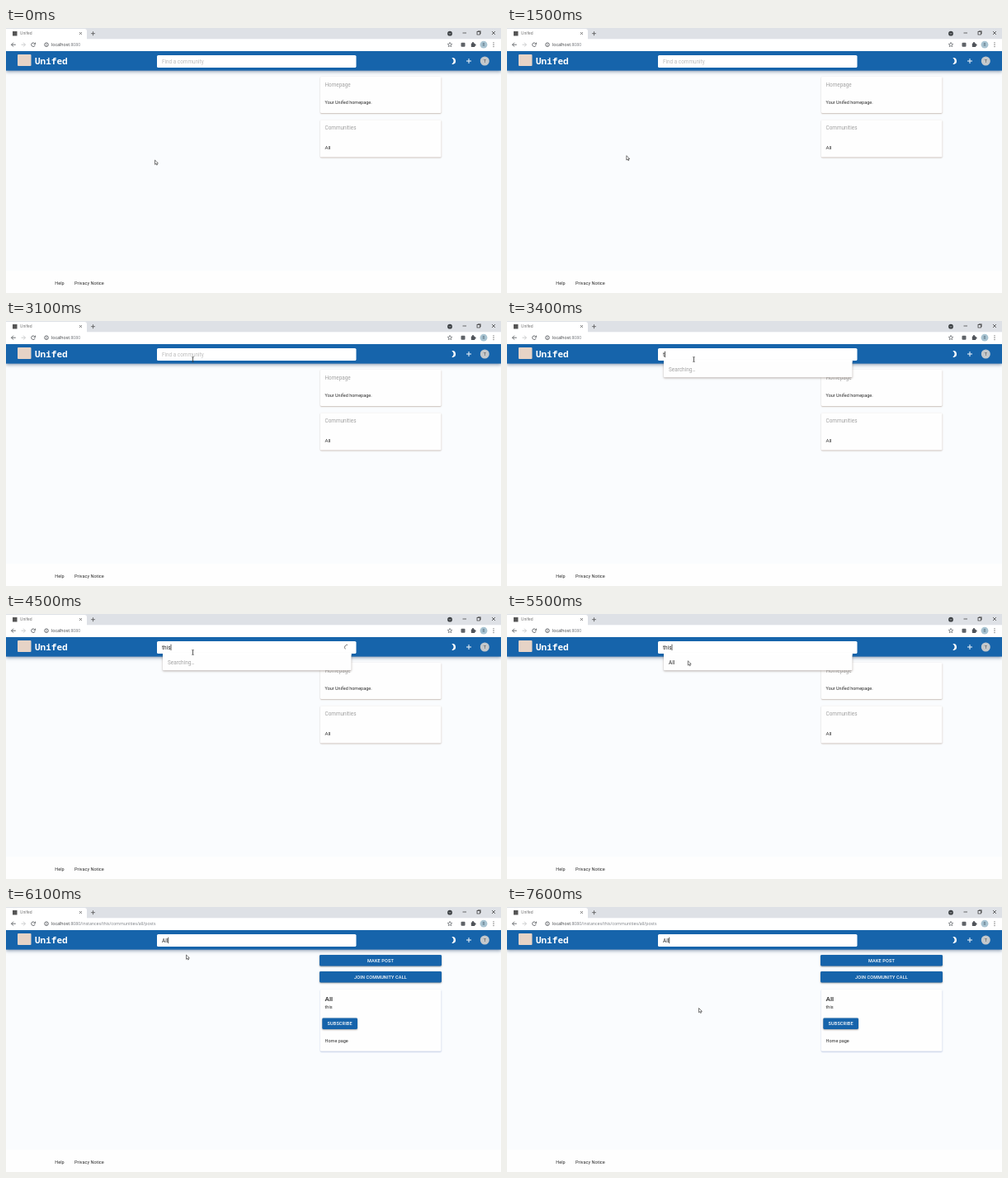
An HTML page with a canvas that plays this animation: 600 by 321 pixels, repeating every 7.7 s.

```html
<!DOCTYPE html>
<html lang="en">
<head>
<meta charset="utf-8">
<title>Community search</title>
<style>
  html, body { margin: 0; width: 100%; height: 100%; overflow: hidden; background: #fafcfe; }
  canvas { display: block; width: 600px; height: 321px; }
</style>
</head>
<body>
<canvas id="stage" width="600" height="321"></canvas>
<script>
const ctx = document.getElementById('stage').getContext('2d');
const LOOP = 7700, STEP = 100, TAU = Math.PI * 2;
const BLUE = '#1664ab', CARD = '#fefefe', INK = '#2c2c2c', GREY = '#a2a2a2';
const ROBOTO = 'Roboto, sans-serif', UI = '"Open Sans", sans-serif', MONO = '"Noto Sans Mono", monospace';

function rect(x, y, w, h, color) {
  ctx.fillStyle = color;
  ctx.fillRect(x, y, w, h);
}

function round(x, y, w, h, r, color) {
  ctx.fillStyle = color;
  ctx.beginPath();
  ctx.roundRect(x, y, w, h, r);
  ctx.fill();
}

function disc(x, y, r, color) {
  ctx.fillStyle = color;
  ctx.beginPath();
  ctx.arc(x, y, r, 0, TAU);
  ctx.fill();
}

function line(points, color, width = 0.8) {
  ctx.strokeStyle = color;
  ctx.lineWidth = width;
  ctx.beginPath();
  points.forEach(([x, y], i) => i ? ctx.lineTo(x, y) : ctx.moveTo(x, y));
  ctx.stroke();
}

function text(str, x, y, size, color = INK, opts = {}) {
  const { font = ROBOTO, weight = 400, align = 'left', spacing = 0 } = opts;
  ctx.font = `${weight} ${size}px ${font}`;
  ctx.letterSpacing = spacing + 'px';
  ctx.textAlign = align;
  ctx.fillStyle = color;
  ctx.fillText(str, x, y);
  const width = ctx.measureText(str).width;
  ctx.letterSpacing = '0px';
  return width;
}

function shadowed(color, blur, dy, draw) {
  ctx.save();
  ctx.shadowColor = color;
  ctx.shadowBlur = blur;
  ctx.shadowOffsetY = dy;
  draw();
  ctx.restore();
}

const clamp = v => Math.max(0, Math.min(1, v));
const ease = v => v * v * (3 - 2 * v);

// Piecewise eased pointer path: [time, x, y]
const PATH = [
  [0, 180.5, 160], [600, 180.5, 160], [700, 140.5, 160], [1400, 140.5, 160],
  [2100, 218.5, 63], [2200, 221, 53], [2500, 226.5, 46.5], [5100, 226.5, 46.5],
  [5600, 218.5, 58], [6200, 218.5, 58], [7000, 232.5, 122.5], [LOOP, 232.5, 122.5]
];

function pointerAt(t) {
  const i = PATH.findIndex(p => p[0] > t);
  const [t0, x0, y0] = PATH[i - 1], [t1, x1, y1] = PATH[i];
  const k = ease(clamp((t - t0) / (t1 - t0)));
  return [x0 + (x1 - x0) * k, y0 + (y1 - y0) * k];
}

function pointer(t) {
  const [x, y] = pointerAt(t);
  if (y < 49) {
    line([[x, y - 2.6], [x, y + 2.6]], '#333', 0.8);
    line([[x - 1.4, y - 2.9], [x + 1.4, y - 2.9]], '#444', 0.6);
    line([[x - 1.4, y + 2.9], [x + 1.4, y + 2.9]], '#444', 0.6);
    return;
  }
  const shape = [[0, 0], [0, 5.3], [1.3, 4.2], [2.1, 6], [3, 5.6], [2.2, 3.9], [3.9, 3.8]];
  ctx.beginPath();
  shape.forEach(([dx, dy]) => ctx.lineTo(x + dx, y + dy));
  ctx.closePath();
  ctx.fillStyle = '#fff';
  ctx.fill();
  ctx.strokeStyle = '#333';
  ctx.lineWidth = 0.65;
  ctx.stroke();
}

// Indeterminate progress ring: steady rotation plus growing, then shrinking arc
function ring(x, y, r, width, elapsed, color) {
  const p = (elapsed % 1400) / 1400;
  const first = p < 0.5;
  const k = ease(first ? p * 2 : p * 2 - 1);
  const tail = first ? 15 * k : 15 + 110 * k;
  const len = first ? 1 + 99 * k : 100;
  const head = Math.min(tail + len, 126);
  const turn = p * TAU;
  ctx.strokeStyle = color;
  ctx.lineWidth = width;
  ctx.beginPath();
  ctx.arc(x, y, r, turn + tail / 126 * TAU, turn + head / 126 * TAU);
  ctx.stroke();
}

function star(x, y, r) {
  const pts = Array.from({ length: 11 }, (_, i) => {
    const a = i * TAU / 10 - TAU / 4, q = i % 2 ? r * 0.45 : r;
    return [x + Math.cos(a) * q, y + Math.sin(a) * q];
  });
  line(pts, '#5f6368', 0.7);
}

function browser(loaded) {
  rect(0, 0, 600, 13.5, '#dee1e6');
  round(0, 1, 98, 14, [0, 3, 0, 0], '#fff');
  rect(0, 13.5, 600, 14.5, '#fff');
  rect(8, 4, 5.5, 5.5, '#555');
  text('Unifed', 17, 8.4, 4.7, '#666', { font: UI });
  line([[89, 5], [92, 8]], '#555', 0.7);
  line([[92, 5], [89, 8]], '#555', 0.7);
  line([[103, 6.7], [108, 6.7]], '#555');
  line([[105.5, 4.2], [105.5, 9.2]], '#555');

  disc(538, 6.7, 2.9, '#3c4043');
  line([[536.8, 6.2], [538, 7.4], [539.2, 6.2]], '#dee1e6', 0.7);
  line([[553.5, 6], [558, 6]], '#333', 0.7);
  ctx.strokeStyle = '#333';
  ctx.lineWidth = 0.7;
  ctx.strokeRect(571, 4.6, 3.4, 3.4);
  line([[572, 4.6], [572, 3.7], [575.3, 3.7], [575.3, 7], [574.4, 7]], '#333', 0.6);
  line([[589, 4], [593, 8]], '#333', 0.7);
  line([[593, 4], [589, 8]], '#333', 0.7);

  line([[11.8, 20.2], [6.5, 20.2]], '#4b4f54');
  line([[9, 17.7], [6.5, 20.2], [9, 22.7]], '#4b4f54');
  line([[18.5, 20.2], [23.3, 20.2]], '#c0c2c5');
  line([[21, 17.7], [23.5, 20.2], [21, 22.7]], '#c0c2c5');
  ctx.strokeStyle = '#4b4f54';
  ctx.lineWidth = 0.8;
  ctx.beginPath();
  ctx.arc(33, 20.2, 2.3, 0.3, TAU - 0.8);
  ctx.stroke();
  line([[35.6, 17.6], [35.6, 19.6], [33.6, 19.6]], '#4b4f54');
  ctx.beginPath();
  ctx.arc(49, 20.2, 2.3, 0, TAU);
  ctx.stroke();
  line([[49, 19.9], [49, 21.5]], '#4b4f54', 0.7);
  rect(48.6, 18.6, 0.8, 0.7, '#4b4f54');

  const w = text('localhost', 55, 22, 5.25, '#33363a', { font: UI });
  const rest = loaded ? ':8080/instances/this/communities/all/posts' : ':8080';
  text(rest, 55 + w, 22, 5.2, '#777b80', { font: UI });

  star(538, 20.3, 2.9);
  round(551.5, 17.7, 5, 5, 1, '#5f6368');
  round(563.8, 18.5, 4.6, 4.4, 0.6, '#50545a');
  disc(566, 18.2, 1.1, '#50545a');
  disc(568.6, 20.6, 1.1, '#50545a');
  disc(579, 20.2, 4.4, '#a9c4d2');
  text('R', 579, 22, 4.6, '#4c6472', { align: 'center' });
  [17.8, 20.2, 22.6].forEach(y => disc(591, y, 0.65, '#555'));
}

function header() {
  shadowed('rgba(30,60,100,.5)', 4, 1, () => rect(0, 28, 600, 23.6, BLUE));
  round(14, 32, 16.5, 14, 1, '#e6d3c6');
  text('Unifed', 35, 44.4, 11, '#fff', { font: MONO, weight: 700 });
  round(183, 33, 241.5, 15, 1.6, '#fff');

  ctx.fillStyle = '#fff';
  ctx.beginPath();
  ctx.arc(541, 40, 4, -1.75, 1.75);
  ctx.quadraticCurveTo(545, 40, 540.3, 36.1);
  ctx.fill();
  line([[558, 40], [564, 40]], '#fff', 0.95);
  line([[561, 37], [561, 43]], '#fff', 0.95);
  disc(580.3, 40, 5.5, '#c4c8cb');
  text('T', 580.3, 42.2, 6, '#555', { align: 'center' });
}

function card(y, h, edge) {
  shadowed(edge, 1.5, 0.7, () => round(381, y, 146.5, h, 1.2, CARD));
}

function button(x, y, w, label) {
  shadowed('rgba(0,0,0,.4)', 2, 0.8, () => round(x, y, w, 13.5, 1.4, BLUE));
  text(label, x + w / 2, y + 8.7, 5.5, '#fff', { weight: 500, align: 'center', spacing: 0.15 });
}

function homePage() {
  const edge = 'rgba(125,90,70,.45)';
  card(59, 44, edge);
  text('Homepage', 386.5, 71.2, 6.4, GREY);
  text('Your Unifed homepage.', 386.5, 92.2, 5.5);
  card(111.5, 45, edge);
  text('Communities', 386.5, 123.1, 6.4, GREY);
  text('All', 386.5, 146.7, 6.2);
}

function communityPage() {
  button(380, 58, 148, 'MAKE POST');
  button(380, 78, 148, 'JOIN COMMUNITY CALL');
  card(100, 74.7, 'rgba(80,110,180,.45)');
  text('All', 386.5, 113.6, 8.1, INK, { weight: 500 });
  text('this', 386.5, 122.8, 5.6);
  button(383.3, 134.5, 42.7, 'SUBSCRIBE');
  text('Home page', 386.5, 163.7, 5.5);
}

function typed(t) {
  if (t >= 5800) return 'All';
  return 'this'.slice(0, [3400, 3700, 4100, 4300].filter(k => t >= k).length);
}

const CARET_ON = [[2500, 3100], [3400, 4800], [5300, 6300], [6600, 7000], [7600, LOOP]];

function search(t) {
  const query = typed(t);
  let width = 0;
  if (query) width = text(query, 189, 42.8, 6.4, INK);
  else text('Find a community', 189, 42.8, 6.4, '#bcbcbc');
  if (CARET_ON.some(([a, b]) => t >= a && t < b)) rect(189.1 + width, 36.7, 0.8, 7.4, '#333');
  if (t >= 3500 && t < 4800) ring(413.6, 40.4, 3.1, 0.8, t - 3420, '#555');
}

function dropdown(t) {
  if (t < 3400 || t >= 5800) return;
  shadowed('rgba(90,70,60,.45)', 2.5, 1, () => round(190, 48, 228.5, 20.2, [0, 0, 1.2, 1.2], '#fefefe'));
  rect(190, 47, 228.5, 3, '#fff');
  if (t < 4800) text('Searching…', 196, 60.7, 6.4, GREY);
  else text('All', 196, 60.7, 6.4);
}

function draw(t) {
  const loaded = t >= 5800;
  rect(0, 0, 600, 321, '#fafcfe');
  rect(0, 294, 600, 27, '#fefefe');
  text('Help', 59.3, 311.3, 5.5);
  text('Privacy Notice', 83, 311.3, 5.6);
  if (!loaded) homePage();
  else if (t >= 6100) communityPage();
  else if (t >= 6000) ring(300, 167, 6.3, 1.2, t - 6000, '#777');
  header();
  browser(loaded);
  dropdown(t);
  search(t);
  pointer(t);
}

const start = performance.now();
function tick(now) {
  const t = Math.max(0, now - start) % LOOP;
  draw(Math.floor(t / STEP) * STEP);
  requestAnimationFrame(tick);
}
draw(0);
requestAnimationFrame(tick);
</script>
</body>
</html>
```
